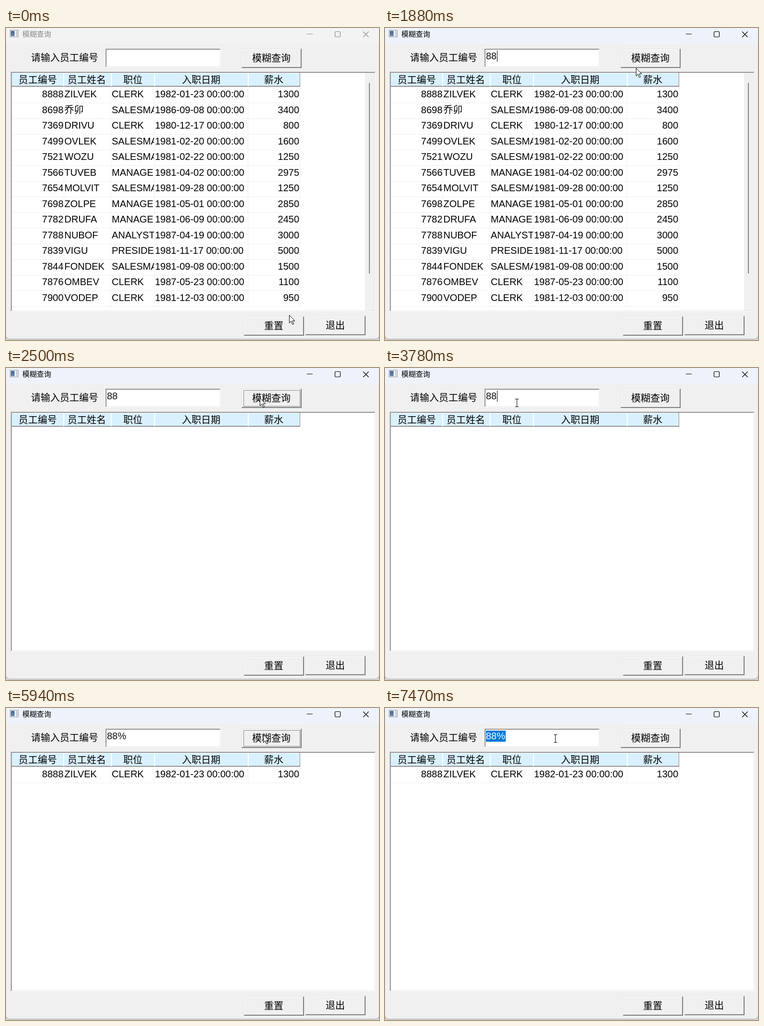
Animation of 776 by 648 pixels, one loop 8000 ms. Source, as an HTML page with a canvas:

```html
<!DOCTYPE html>
<html lang="zh-CN">
<head>
<meta charset="utf-8">
<title>模糊查询</title>
<style>
html, body { margin: 0; width: 100%; height: 100%; overflow: hidden; background: #f0f0f0; }
canvas { display: block; }
</style>
</head>
<body>
<canvas id="stage" width="776" height="648"></canvas>
<script>
const LOOP = 8000;
const ctx = document.getElementById('stage').getContext('2d');
const FONT = '"Liberation Sans", "Noto Sans CJK SC", "Noto Sans CJK", sans-serif';
const DARK = '#858585';

const ROWS = `8888 ZILVEK CLERK 1982-01-23 1300
8698 乔卯 SALESMAN 1986-09-08 3400
7369 DRIVU CLERK 1980-12-17 800
7499 OVLEK SALESMAN 1981-02-20 1600
7521 WOZU SALESMAN 1981-02-22 1250
7566 TUVEB MANAGER 1981-04-02 2975
7654 MOLVIT SALESMAN 1981-09-28 1250
7698 ZOLPE MANAGER 1981-05-01 2850
7782 DRUFA MANAGER 1981-06-09 2450
7788 NUBOF ANALYST 1987-04-19 3000
7839 VIGU PRESIDENT 1981-11-17 5000
7844 FONDEK SALESMAN 1981-09-08 1500
7876 OMBEV CLERK 1987-05-23 1100
7900 VODEP CLERK 1981-12-03 950`.split('\n').map(line => line.split(' '));

const EDGES = [12, 120, 218, 308, 503, 611];
const HEADS = [['员工编号', 26], ['员工姓名', 128], ['职位', 244], ['入职日期', 366], ['薪水', 537]];

// Pointer path: time, x, y
const PATH = [
  [30, 589, 596], [330, 450, 330], [680, 290, 64], [1600, 290, 64],
  [1880, 522, 83], [2240, 528, 65], [2360, 528, 62], [2660, 528, 62],
  [2960, 430, 168], [3260, 250, 150], [3440, 224, 74], [3760, 274, 72],
  [5150, 274, 72], [5520, 500, 41], [5760, 535, 55], [6160, 535, 55],
  [6540, 282, 63], [6870, 282, 63], [7180, 214, 63], [7460, 354, 63]
];

const within = (t, a, b) => t >= a && t < b;
const clamp = v => Math.max(0, Math.min(1, v));
const mix = (a, b, k) => a + (b - a) * k;
const blend = (a, b, k) => `rgb(${a.map((v, i) => Math.round(mix(v, b[i], k)))})`;

function box(x, y, w, h, color) {
  ctx.fillStyle = color;
  ctx.fillRect(x, y, w, h);
}

function text(str, x, y, color = '#000', size = 20, align = 'left') {
  ctx.font = `${size}px ${FONT}`;
  ctx.textAlign = align;
  ctx.fillStyle = color;
  ctx.fillText(str, x, y);
}

function bevel(x, y, w, h, light, dark) {
  box(x, y, w, 1, light);
  box(x, y, 1, h, light);
  box(x, y + h - 1, w, 1, dark);
  box(x + w - 1, y, 1, h, dark);
}

function sunken(x, y, w, h) {
  box(x, y, w, h, '#fff');
  bevel(x, y, w, h, '#a0a0a0', '#fff');
  bevel(x + 1, y + 1, w - 2, h - 2, DARK, '#e3e3e3');
}

function button(label, x, y, tx, ty, pressed, focused) {
  const w = 125, h = 40;
  const light = pressed ? DARK : '#fff', dark = pressed ? '#fff' : DARK;
  box(x, y, w, h, '#f0f0f0');
  bevel(x, y, w, h, pressed ? DARK : '#e3e3e3', pressed ? '#fff' : '#757575');
  bevel(x + 1, y + 1, w - 2, h - 2, light, dark);
  const d = pressed ? 1 : 0;
  text(label, tx + d, ty + d);
  if (focused) {
    ctx.strokeStyle = '#222';
    ctx.lineWidth = 1;
    ctx.setLineDash([1, 1]);
    ctx.strokeRect(x + 4.5, y + 3.5, w - 8, h - 7);
    ctx.setLineDash([]);
  }
}

function titleBar(t) {
  const active = clamp((t - 700) / 110);
  box(0, 0, 776, 32, blend([243, 243, 243], [238, 243, 251], active));
  const ink = blend([138, 138, 138], [0, 0, 0], t < 700 ? 0 : t < 880 ? 0.6 : 1);
  box(8, 4, 18, 15, '#8c9096');
  box(9, 5, 16, 13, '#fff');
  const shade = ctx.createLinearGradient(10, 6, 18, 17);
  shade.addColorStop(0, '#3f5f96');
  shade.addColorStop(1, '#6f8fa8');
  box(10, 6, 8, 11, shade);
  box(21, 6, 3, 11, '#c4c9cf');
  text('模糊查询', 34, 18, ink, 15);
  box(626, 12, 12, 1, ink);
  ctx.strokeStyle = ink;
  ctx.lineWidth = 1.2;
  ctx.beginPath();
  ctx.roundRect(684.5, 7.5, 11, 11, 1.5);
  ctx.moveTo(743, 7.5);
  ctx.lineTo(754.5, 19);
  ctx.moveTo(754.5, 7.5);
  ctx.lineTo(743, 19);
  ctx.stroke();
}

function cell(str, col, y, x, align) {
  ctx.save();
  ctx.beginPath();
  ctx.rect(EDGES[col], y - 24, EDGES[col + 1] - EDGES[col], 34);
  ctx.clip();
  text(str, x, y, '#000', 20, align);
  ctx.restore();
}

function table(count) {
  sunken(10, 91, 759, 498);
  box(12, 94, 600, 27, '#d9f1ff');
  box(12, 93, 600, 1, '#fff');
  box(12, 120, 600, 1, '#a0a0a0');
  box(12, 121, 600, 1, DARK);
  box(611, 93, 1, 29, DARK);
  for (const x of [119, 218, 308, 503]) box(x, 94, 2, 27, '#fff');
  for (const [label, x] of HEADS) text(label, x, 115);

  ROWS.slice(0, count).forEach(([id, name, job, date, pay], i) => {
    const bottom = Math.round(155 + i * 32.5), y = bottom - 11;
    const top = Math.round(122.5 + i * 32.5);
    box(12, bottom, 600, 1, '#efefef');
    for (const x of EDGES.slice(1)) box(x, top, 1, bottom - top, '#efefef');
    cell(id, 0, y, 119.5, 'right');
    cell(name, 1, y, 121.5);
    cell(job, 2, y, 220);
    cell(date + ' 00:00:00', 3, y, 310);
    cell(pay, 4, y, 610, 'right');
  });

  if (count > 13) {
    box(747, 93, 20, 494, '#f0f0f0');
    box(755, 114, 2, 396, '#868686');
  }
}

function input(t, mouseX) {
  sunken(207, 43, 240, 39);
  const value = t < 1470 ? '' : t < 1740 ? '8' : t < 4530 ? '88' : '88%';
  text(value, 210, 65, '#111');
  const end = 210 + ctx.measureText(value).width;

  if (t >= 6940) {
    const from = t >= 7180 ? 210 : Math.max(210, Math.min(end, mouseX));
    if (end - from > 4) {
      // Snap the selection to whole characters
      const start = from > 238 ? 232 : from > 227 ? 221 : 210;
      box(start, 47, 251 - start, 23, '#0078d7');
      ctx.save();
      ctx.beginPath();
      ctx.rect(start, 47, 251 - start, 23);
      ctx.clip();
      text(value, 210, 65, '#fff');
      ctx.restore();
    }
  }
  const caret = within(t, 740, 1270) || within(t, 1470, 2300) ||
    within(t, 3780, 4330) || within(t, 4530, 5060) || within(t, 6870, 6940);
  if (caret) box(value ? Math.round(end + 0.7) : 210, 47, 1, 23, '#000');
}

function pointer(t) {
  let i = PATH.findIndex(p => p[0] > t);
  if (i === 0) i = 1;
  if (i < 0) return PATH[PATH.length - 1].slice(1);
  const [t0, x0, y0] = PATH[i - 1], [t1, x1, y1] = PATH[i];
  const k = clamp((t - t0) / (t1 - t0)), e = k * k * (3 - 2 * k);
  return [Math.round(mix(x0, x1, e)), Math.round(mix(y0, y1, e))];
}

function cursor(x, y) {
  ctx.save();
  ctx.translate(x, y);
  if (x > 208 && x < 447 && y > 44 && y < 81) {
    box(0, -8, 1, 17, '#000');
    for (const v of [-8, 8]) {
      box(-3, v, 3, 1, '#000');
      box(1, v, 3, 1, '#000');
    }
  } else {
    const shape = new Path2D('M.5 .5V16.5L4.3 13L7 19.8L9.6 18.7L6.8 12.2H11.8Z');
    ctx.fillStyle = '#fff';
    ctx.fill(shape);
    ctx.strokeStyle = '#000';
    ctx.lineWidth = 1;
    ctx.stroke(shape);
  }
  ctx.restore();
}

function draw(t) {
  box(0, 0, 776, 648, '#dcdcdc');
  ctx.fillStyle = '#f0f0f0';
  ctx.strokeStyle = '#a6a6a6';
  ctx.lineWidth = 1.2;
  ctx.beginPath();
  ctx.roundRect(-0.5, -10, 777, 656, 8);
  ctx.fill();
  ctx.stroke();

  const [x, y] = pointer(t);
  titleBar(t);
  text('请输入员工编号', 52, 69);
  input(t, x);
  button('模糊查询', 490, 43, 512, 70,
    within(t, 2300, 2500) || within(t, 5800, 5940),
    within(t, 2300, 3780) || within(t, 5800, 6870));
  table(t < 2500 ? ROWS.length : t < 5940 ? 0 : 1);
  button('重置', 495, 599, 537, 626);
  button('退出', 623, 598, 665, 625);

  // The pointer hides while keys are typed
  if (!within(t, 1470, 1620) && !within(t, 4530, 5200)) cursor(x, y);
}

function tick(now) {
  draw(now % LOOP);
  requestAnimationFrame(tick);
}
draw(0);
requestAnimationFrame(tick);
</script>
</body>
</html>
```
